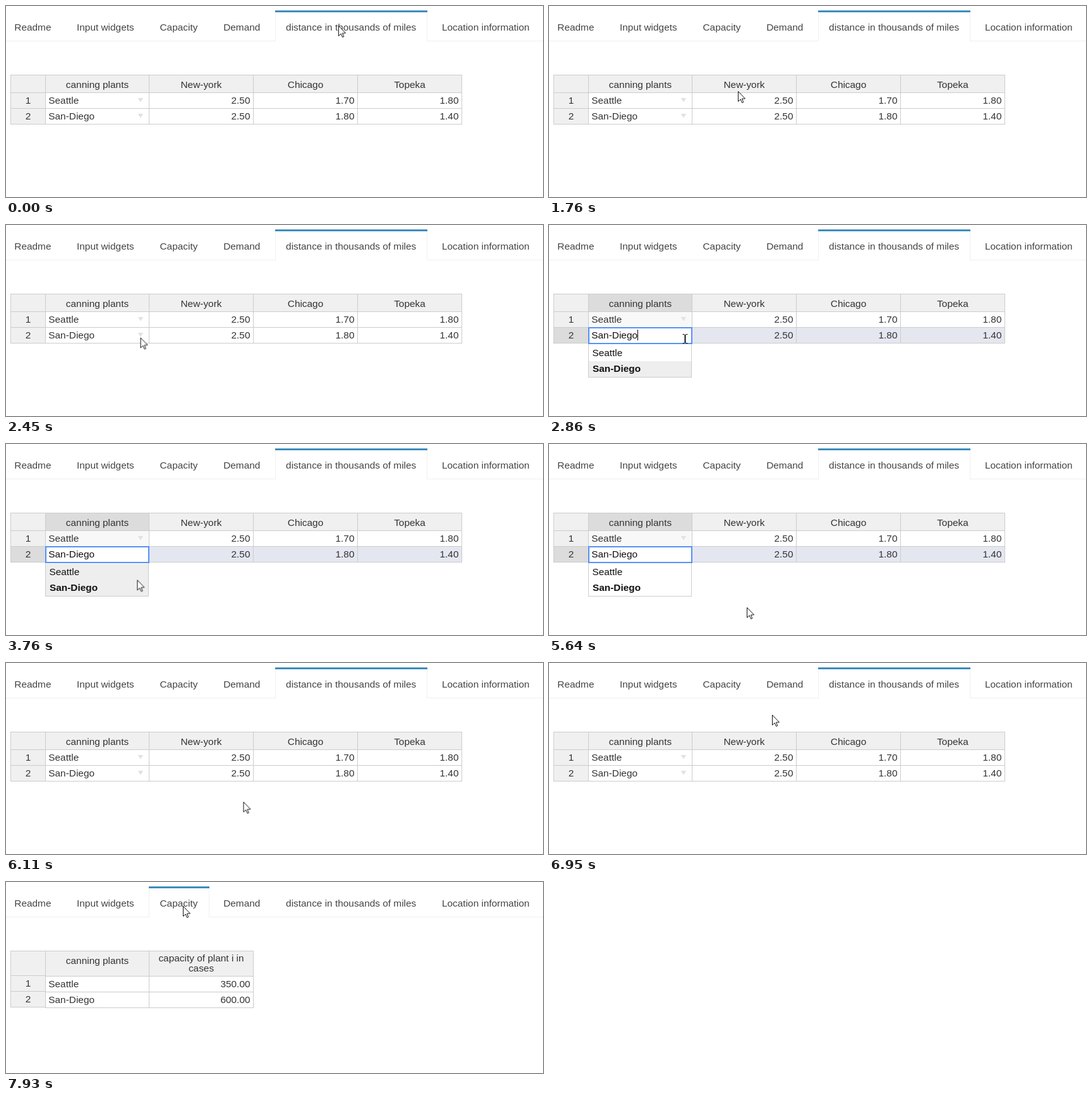
These frames come from a looping animation (850x303 px, 8000 ms). An HTML page:

```html
<!DOCTYPE html>
<html lang="en">
<head>
<meta charset="utf-8">
<title>Table tabs</title>
<style>
html, body { margin: 0; width: 100%; height: 100%; overflow: hidden; background: #fff; }
svg { display: block; width: 850px; height: 303px; font: 15.4px "Liberation Sans", Arial, sans-serif; }
text { fill: #333; }
rect, path { shape-rendering: crispEdges; }
.tabs text { fill: #444; }
.mid { text-anchor: middle; }
.num { text-anchor: end; }
.line { fill: none; stroke: #ccc; }
.rule { fill: none; stroke: #f0f0f0; }
.head { fill: #f0f0f0; }
.bar { fill: #3c8dbc; }
.picked { fill: #dcdcdc; }
.hint { fill: #e2e2e2; }
.edit text { fill: #111; }

/* One 8 s loop; 1% is 80 ms */
.distance, .capacity, .edit, .caret, .hover, .chosen, .arrow, .beam {
  animation: 8s step-end infinite;
}
.distance { animation-name: distance; }
.capacity { animation-name: capacity; }
.edit { animation-name: edit; }
.caret { animation-name: caret; }
.hover { animation-name: hover; }
.chosen { animation-name: chosen; }
.arrow { animation-name: arrow; }
.beam { animation-name: beam; }
.tabs .link { animation: link 8s step-end infinite; }
.pointer { animation: move 8s linear infinite; }

@keyframes distance { 0% { opacity: 1; } 97.5%, 100% { opacity: 0; } }
@keyframes capacity { 0% { opacity: 0; } 97.5%, 100% { opacity: 1; } }
@keyframes edit { 0%, 72.1%, 100% { opacity: 0; } 34.85% { opacity: 1; } }
@keyframes caret {
  0%, 42.375%, 55.45%, 68.7%, 100% { opacity: 0; }
  34.85%, 49%, 62.1% { opacity: 1; }
}
@keyframes hover {
  0%, 46.02%, 51.95%, 63.85%, 100% { opacity: 0; }
  42.6%, 46.87%, 52.84% { opacity: 1; }
}
@keyframes chosen { 0% { opacity: 1; } 58.75%, 100% { opacity: 0; } }
@keyframes arrow {
  0%, 42.6%, 52.84%, 100% { opacity: 1; }
  34.85%, 51.95% { opacity: 0; }
}
@keyframes beam {
  0%, 42.6%, 52.84%, 100% { opacity: 0; }
  34.85%, 51.95% { opacity: 1; }
}
@keyframes link { 0%, 97.5%, 100% { fill: #444; } 91.3% { fill: #999; } }

@keyframes move {
  0% { transform: translate(526px, 31px); }
  12.625% { transform: translate(526px, 31px); animation-timing-function: steps(4, start); }
  16.04% { transform: translate(458px, 60px); animation-timing-function: steps(4, start); }
  19.45% { transform: translate(346px, 112px); animation-timing-function: steps(4, start); }
  22.85% { transform: translate(299px, 135px); animation-timing-function: steps(6, start); }
  27.975% { transform: translate(203px, 172px); animation-timing-function: steps(5, start); }
  32.25% { transform: translate(215px, 180px); }
  41.75% { transform: translate(215px, 180px); animation-timing-function: steps(6, start); }
  46.875% { transform: translate(208px, 220px); animation-timing-function: steps(7, start); }
  52.8375% { transform: translate(204px, 188px); animation-timing-function: steps(4, start); }
  56.25% { transform: translate(206px, 197px); }
  58.75% { transform: translate(206px, 197px); animation-timing-function: steps(2, start); }
  60.5% { transform: translate(214px, 200px); }
  63.875% { transform: translate(214px, 200px); animation-timing-function: steps(9, start); }
  71.3% { transform: translate(313px, 259px); }
  72.125% { transform: translate(313px, 259px); animation-timing-function: steps(3, start); }
  74.625% { transform: translate(319px, 250px); animation-timing-function: steps(6, start); }
  79.875% { transform: translate(432px, 190px); animation-timing-function: steps(6, start); }
  85.125% { transform: translate(389px, 106px); animation-timing-function: steps(3, start); }
  87.6625% { transform: translate(353px, 82px); animation-timing-function: steps(7, start); }
  93.75%, 100% { transform: translate(280px, 38px); }
}
</style>
</head>
<body>
<svg viewBox="0 0 850 303">
  <path class="rule" d="M0 55.5H850"/>

  <g class="distance">
    <path d="M426 10H667V56H426Z" fill="#fff"/>
    <path class="rule" d="M426.5 10V56M666.5 10V56"/>
    <rect class="bar" x="426" y="7" width="241" height="3"/>

    <path class="head" d="M7 109H722V137H63V188H7Z"/>
    <g class="edit">
      <path class="picked" d="M62 109H227V138H62ZM7 162H62V188H7Z"/>
      <rect x="63" y="138" width="163" height="24" fill="#f8f8f9"/>
      <rect x="227" y="163" width="494" height="24" fill="#e4e7f0"/>
    </g>
    <path class="line" d="M7 109.5H722M7 137.5H722M7 162.5H722M7 187.5H722
      M7.5 109V188M62.5 109V188M226.5 109V188M391.5 109V188M556.5 109V188M721.5 109V188"/>
    <path class="hint" d="M209 146H217L213 153ZM209 171H217L213 178Z"/>

    <g class="mid">
      <text x="144.5" y="130">canning plants</text>
      <text x="309" y="130">New-york</text>
      <text x="474" y="130">Chicago</text>
      <text x="639" y="130">Topeka</text>
      <text x="35" y="155">1</text>
      <text x="35" y="180">2</text>
    </g>
    <text x="67.3" y="155">Seattle</text>
    <text x="67.3" y="180">San-Diego</text>
    <g class="num">
      <text x="386.5" y="155">2.50</text>
      <text x="551.5" y="155">1.70</text>
      <text x="716.5" y="155">1.80</text>
      <text x="386.5" y="180">2.50</text>
      <text x="551.5" y="180">1.80</text>
      <text x="716.5" y="180">1.40</text>
    </g>

    <g class="edit">
      <rect x="62.5" y="188.5" width="163" height="53" fill="#fff" stroke="#ccc"/>
      <rect class="hover" x="63" y="190" width="162" height="26" fill="#eee"/>
      <rect class="chosen" x="63" y="216" width="162" height="25" fill="#eee"/>
      <text x="68.4" y="208">Seattle</text>
      <text x="69" y="233" font-weight="bold">San-Diego</text>
      <rect x="63" y="163" width="163" height="25" fill="#fff" stroke="#5292f7" stroke-width="2"/>
      <text x="67.3" y="180">San-Diego</text>
      <rect class="caret" x="140" y="166" width="1" height="17"/>
    </g>
  </g>

  <g class="capacity">
    <path d="M226 10H322V56H226Z" fill="#fff"/>
    <path class="rule" d="M226.5 10V56M321.5 10V56"/>
    <rect class="bar" x="226" y="7" width="96" height="3"/>

    <path class="head" d="M7 109H392V149H63V199H7Z"/>
    <path class="line" d="M7 109.5H392M7 148.5H62M62 149.5H392M7 173.5H62M62 174.5H392
      M7 198.5H62M62 199.5H392M7.5 109V199M62.5 109V200M226.5 109V200M391.5 109V200"/>
    <g class="mid">
      <text x="144.5" y="130">canning plants</text>
      <text x="309" y="126">capacity of plant i in</text>
      <text x="309" y="142">cases</text>
      <text x="35" y="166">1</text>
      <text x="35" y="191">2</text>
    </g>
    <text x="67.3" y="167">Seattle</text>
    <text x="67.3" y="192">San-Diego</text>
    <g class="num">
      <text x="386.5" y="167">350.00</text>
      <text x="386.5" y="192">600.00</text>
    </g>
  </g>

  <g class="tabs">
    <text x="13.3" y="39">Readme</text>
    <text x="112" y="39">Input widgets</text>
    <text class="link" x="243.5" y="39">Capacity</text>
    <text x="344.2" y="39">Demand</text>
    <text x="443.1" y="39">distance in thousands of miles</text>
    <text x="690" y="39">Location information</text>
  </g>

  <g class="pointer">
    <polygon class="arrow" points=".5,.5 .5,16.5 4.2,13 6.6,18.5 8.8,17.6 6.5,12.2 11.5,12"
      fill="#fff" stroke="#111"/>
    <path class="beam" d="M-4 -6.5H-1M1 -6.5H4M-4 7.5H-1M1 7.5H4M0 -6V7" transform="translate(.5)"
      fill="none" stroke="#111" stroke-width="1.4"/>
  </g>
</svg>
</body>
</html>
```
